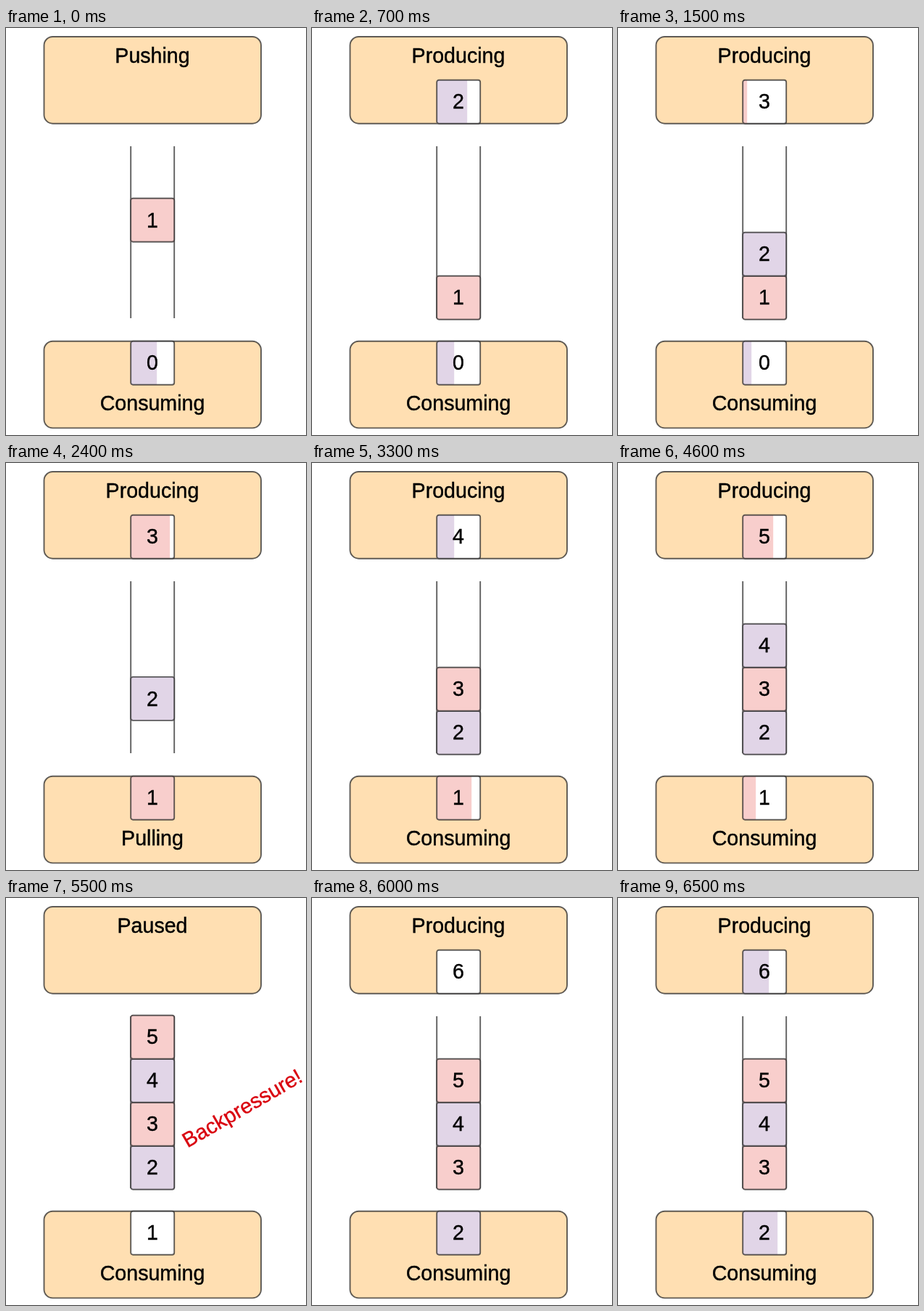
Recreate the animation shown at these times as an HTML page. Size 414 by 561 pixels, loop 6600 ms.

```html
<!DOCTYPE html>
<html lang="en">
<head>
<meta charset="utf-8">
<title>Stream queue</title>
<style>
  html, body { margin: 0; width: 100%; height: 100%; overflow: hidden; background: #fff; }
  svg { display: block; width: 100%; height: 100%; }
  text {
    font: 28.6px "Liberation Sans", Arial, sans-serif; text-anchor: middle;
    stroke: #000; stroke-width: .4;
  }
  .stage { fill: #ffdfb2; }
  .stage, .pipe, .outline { stroke: #222; stroke-opacity: .72; stroke-width: 1.9; }
  .outline { fill: none; }
  #alert { fill: #d9000d; stroke: #d9000d; font-size: 29px; text-anchor: start; }
</style>
</head>
<body>
<svg viewBox="0 0 414 561">
  <rect class="stage" x="52.5" y="12" width="299.5" height="119.7" rx="12"/>
  <rect class="stage" x="52.5" y="431.7" width="299.5" height="119.7" rx="12"/>
  <path class="pipe" d="M172.2 163V400M232.2 163V400"/>
  <text id="producer" x="202" y="48"></text>
  <text id="consumer" x="202" y="527.3"></text>
  <g id="items"></g>
  <text id="alert" transform="translate(250.5 344.7) rotate(-30)">Backpressure!</text>
</svg>
<script>
const TICK = 100, TICKS = 66;
const SIZE = 60, LEFT = 172.2, TOP = 71.7, QUEUE_END = 341.7;
const COLORS = ['#e1d5e7', '#f8cecc'];

// All times are in ticks. "step" is the time for one tenth of an item.
const items = [
  { n: 0, make: -99, step: 1, push: -90, sent: -88, slot: 0 },
  { n: 1, make: -12, step: 1, push: -1.6, sent: 1.05, slot: 0 },
  { n: 2, make: 1.05, step: .84, push: 10, sent: 13, slot: 1 },
  { n: 3, make: 13, step: 1.15, push: 25, sent: 28.9, slot: 1 },
  { n: 4, make: 28.9, step: .85, push: 38, sent: 41, slot: 2 },
  { n: 5, make: 41, step: .68, push: 48.5, sent: 51, slot: 3 },
  { n: 6, make: 59.1, step: .95, push: 99, sent: 102, slot: 3 }
];
const pulls = [
  { n: 0, from: -17, taken: -15, done: -13, step: 3.2, end: 21.2 },
  { n: 1, from: 21.2, taken: 23.55, done: 25.6, step: 2.8, end: 56 },
  { n: 2, from: 56, taken: 57.5, done: 59.1, step: 2.5, end: 99 }
];

const $ = id => document.getElementById(id);
const clamp = (v, lo, hi) => Math.min(hi, Math.max(lo, v));
const progress = (t, a, b) => clamp((t - a) / (b - a), 0, 1);
const tenths = (t, start, step) => clamp(Math.floor((t - start) / step), 0, 10);

function add(parent, tag, attrs) {
  const el = document.createElementNS('http://www.w3.org/2000/svg', tag);
  for (const key in attrs) el.setAttribute(key, attrs[key]);
  return parent.appendChild(el);
}

for (const item of items) {
  const box = { width: SIZE, height: SIZE, rx: 3 };
  item.el = add($('items'), 'g', {});
  add(item.el, 'rect', { ...box, fill: '#fff' });
  item.fill = add(item.el, 'rect', { ...box, rx: 1, fill: COLORS[item.n % 2] });
  add(item.el, 'rect', { ...box, class: 'outline' });
  add(item.el, 'text', { x: SIZE / 2 - .3, y: 39.8 }).textContent = item.n;
  item.pull = pulls.find(p => p.n === item.n);
}

function itemY(item, t) {
  const target = QUEUE_END - SIZE * item.slot;
  let y = TOP + (target - TOP) * progress(t, item.push, item.sent);
  for (const p of pulls) {
    if (p.n === item.n) y += 90 * progress(t, p.from, p.taken);
    else if (p.n < item.n && item.push < p.taken && item.slot > 0) {
      y += SIZE * progress(t, p.taken, p.done);
    }
  }
  return y;
}

function itemLevel(item, t) {
  const p = item.pull;
  return p && t >= p.done
    ? 10 - tenths(t, p.done, p.step)
    : tenths(t, item.make, item.step);
}

function render(t) {
  for (const item of items) {
    const visible = t >= item.make && !(item.pull && t >= item.pull.end);
    item.el.setAttribute('visibility', visible ? 'visible' : 'hidden');
    item.el.setAttribute('transform', `translate(${LEFT} ${itemY(item, t)})`);
    item.fill.setAttribute('width', SIZE * itemLevel(item, t) / 10);
  }
  const pushing = items.some(i => t >= i.push && t < i.sent);
  const making = items.some(i => t >= i.make && t < i.push);
  const pulling = pulls.some(p => t >= p.from && t < p.done);
  const paused = !pushing && !making;
  $('producer').textContent = pushing ? 'Pushing' : making ? 'Producing' : 'Paused';
  $('consumer').textContent = pulling ? 'Pulling' : 'Consuming';
  $('alert').setAttribute('visibility', paused ? 'visible' : 'hidden');
}

const began = performance.now();
function frame() {
  render(Math.floor((performance.now() - began) / TICK) % TICKS);
  requestAnimationFrame(frame);
}
frame();
</script>
</body>
</html>
```
